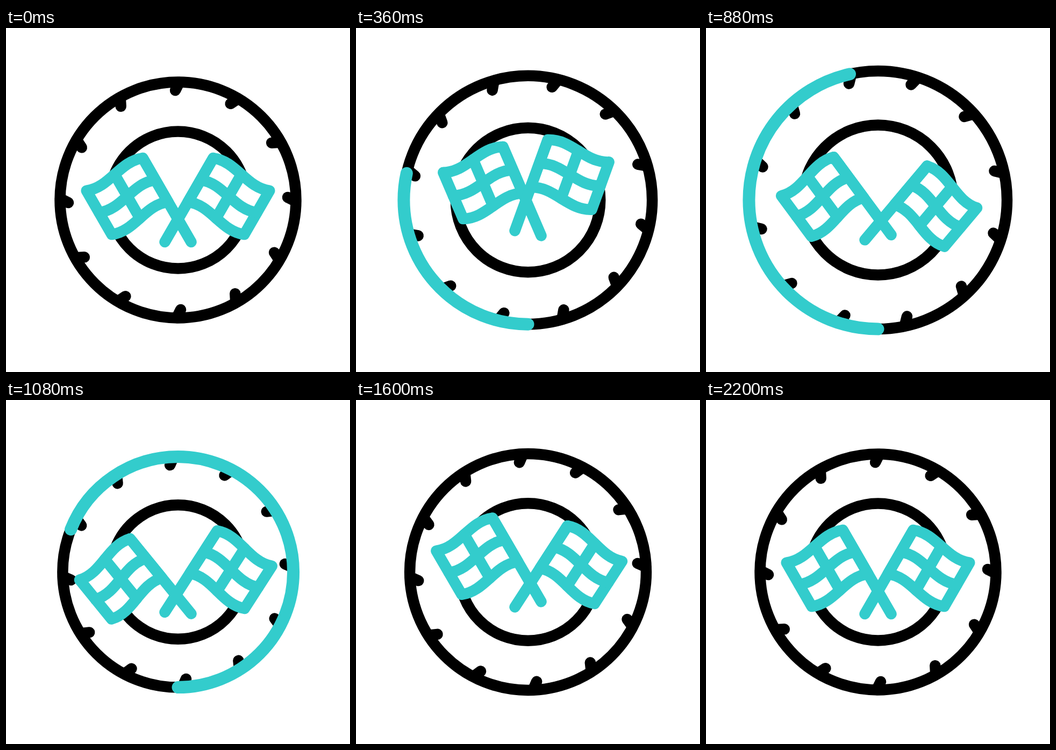
Animation, 640 px wide and 640 px high, one loop 2440 ms. Source, as an HTML page:

```html
<!DOCTYPE html>
<html lang="en">
<head>
<meta charset="utf-8">
<title>Wheel and flags</title>
<style>
  html, body { margin: 0; width: 100%; height: 100%; overflow: hidden; background: #fff; }
  svg { display: block; width: 100vw; height: 100vh; }
  svg * { stroke-linecap: round; stroke-linejoin: round; }
  #wheel { fill: none; stroke: #000; }
  .arc { stroke: #33cccc; }
  .flag { fill: #fff; stroke: #33cccc; stroke-width: 20.5; }
  .line { fill: none; }
</style>
</head>
<body>
<svg viewBox="0 0 640 640">
  <defs>
    <g id="flag">
      <path d="M0 -180 c40 -17 81 17 121 0 v94 c-40 17 -81 -17 -121 0 z"/>
      <path class="line" d="M0 0 V-180 M0 -133 c40 -17 81 17 121 0 M60.5 -180 v94"/>
    </g>
  </defs>
  <g id="wheel">
    <circle r="127.5"/>
    <g id="ticks"></g>
    <circle r="219.5"/>
    <circle class="arc" r="219.5" pathLength="360" transform="rotate(90)"/>
    <circle class="arc" r="219.5" pathLength="360" transform="rotate(90)"/>
  </g>
  <use class="flag" id="left" href="#flag"/>
  <use class="flag" id="right" href="#flag"/>
</svg>
<script>
const LOOP = 2440, STEP = 40, END = 2200;
const $ = id => document.getElementById(id);
const clamp = x => Math.min(1, Math.max(0, x));
const ease = x => (1 - Math.cos(Math.PI * clamp(x))) / 2;

// Keys are [time in ms, value]
function segment(keys, t) {
  let i = 0;
  while (i < keys.length - 2 && t >= keys[i + 1][0]) i++;
  return i;
}

function swing(keys, t) {
  const i = segment(keys, t), [t0, a] = keys[i], [t1, b] = keys[i + 1];
  return a + (b - a) * ease((t - t0) / (t1 - t0));
}

function glide(keys, t) {
  const slope = j => {
    const p = keys[Math.max(0, j - 1)], q = keys[Math.min(keys.length - 1, j + 1)];
    return (q[1] - p[1]) / (q[0] - p[0]);
  };
  const i = segment(keys, t), [t0, a] = keys[i], [t1, b] = keys[i + 1];
  const d = t1 - t0, x = clamp((t - t0) / d), y = 1 - x;
  return a * y * y * (1 + 2 * x) + b * x * x * (1 + 2 * y)
    + d * x * y * (slope(i) * y - slope(i + 1) * x);
}

const SCALE = [[0, 1], [770, 1.118], [1245, 0.926], [1755, 1.0225], [END, 1]];
const SPIN = [[0, 0], [360, 43.4], [600, 82.7], [880, 137.4], [1280, 215.3], [1600, 266.9], [END, 360]];
const HOP = [[0, 0], [520, -26.5], [995, 0], [1370, -26.5], [1820, 0]];
const TILT = [[0, 30], [400, 19.7], [900, 40.2], [1250, 26], [1680, 33.6], [2080, 30]];
const ARC_STARTS = [240, 720], ARC_TIME = 335, ARC_LAG = 234, LEFT_LAG = 120;

const wheel = $("wheel"), ticks = $("ticks");
const arcs = [...document.querySelectorAll(".arc")];
ticks.innerHTML = Array.from({ length: 12 }, (_, i) =>
  `<path d="M-5 -204 L2.5 -219" transform="rotate(${i * 30})"/>`).join("");

function drawArc(arc, t, scale) {
  const head = 360 * ease(t / ARC_TIME);
  const tail = 360 * ease((t - ARC_LAG) / ARC_TIME);
  arc.style.display = head > tail ? "" : "none";
  arc.setAttribute("stroke-width", 23 / scale);
  arc.setAttribute("stroke-dasharray", `${head - tail} 400`);
  arc.setAttribute("stroke-dashoffset", -tail);
}

function drawFlag(flag, x, side, t) {
  flag.setAttribute("transform",
    `translate(${x} ${398 + swing(HOP, t)}) scale(${side} 1) rotate(${swing(TILT, t)})`);
}

function draw() {
  const now = performance.now() % LOOP;
  const t = Math.min(END, Math.floor(now / STEP) * STEP);
  const scale = swing(SCALE, t);
  wheel.setAttribute("transform", `translate(320 320) scale(${scale})`);
  wheel.setAttribute("stroke-width", 20.5 / scale);
  ticks.setAttribute("transform", `rotate(${glide(SPIN, t)})`);
  arcs.forEach((arc, i) => drawArc(arc, t - ARC_STARTS[i], scale));
  drawFlag($("left"), 344.5, -1, t - LEFT_LAG);
  drawFlag($("right"), 295.5, 1, t);
  requestAnimationFrame(draw);
}
draw();
</script>
</body>
</html>
```
